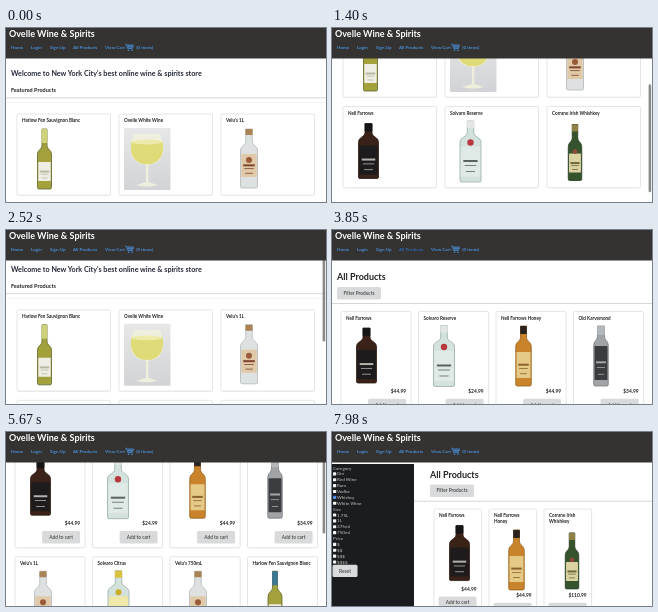
Write an HTML page that moves like this. It is 320 by 174 pixels and loops after 8000 ms.

```html
<!DOCTYPE html>
<html lang="en">
<head>
<meta charset="utf-8">
<title>Wine store</title>
<style>
html, body { margin: 0; width: 100%; height: 100%; overflow: hidden; background: #fff; }
svg { display: block; width: 100vw; height: 100vh; font-family: Lato, sans-serif; }
</style>
</head>
<body>
<svg id="stage" viewBox="0 0 320 174"></svg>
<script>
const LOOP = 8000, PAGE_AT = 3570, HOVER_END = 4270, FILTER_AT = 7350;
const stage = document.getElementById('stage');

const rect = (x, y, w, h, fill, r = 0, extra = '') =>
  `<rect x="${x}" y="${y}" width="${w}" height="${h}" rx="${r}" fill="${fill}" ${extra}/>`;
const text = (x, y, size, str, fill = '#222', weight = 700, anchor = 'start') =>
  `<text x="${x}" y="${y}" font-size="${size}" font-weight="${weight}" fill="${fill}" text-anchor="${anchor}">${str.replace(/&/g, '&amp;')}</text>`;
const group = (x, y, body) => `<g transform="translate(${x} ${y})">${body}</g>`;
const button = (x, y, w, label, fill = '#d9dadb') =>
  rect(x, y, w, 12.4, fill, 1.5) + text(x + w / 2, y + 7.8, 4.75, label, '#555', 700, 'middle');
const card = (x, y, w, h) =>
  rect(x, y + .6, w, h, '#eee', 1.5) + rect(x, y, w, h, '#fff', 1.5, 'stroke="#dcdcde" stroke-width=".7"');

// Bottle centred on x = 0, standing in a box 62 high.
// label: [y, height, colour, ink], tag: [y, radius, colour]
function bottle({ w, neck, top, base, shoulder, glass, edge, cap, capH, label, tag }) {
  const b = w / 2, n = neck / 2, s = shoulder;
  const [ly, lh, lc, ink] = label;
  const lines = [.45, .62, .82].map((f, i) =>
    rect(-w * (.34 - i * .06), ly + lh * f, w * (.68 - i * .12), i ? .8 : 2, ink)).join('');
  return `<path d="M${-n} ${top}H${n}V${s - 6}C${n} ${s - 1} ${b} ${s - 2} ${b} ${s + 4}V${base - 1.5}Q${b} ${base} ${b - 1.5} ${base}H${1.5 - b}Q${-b} ${base} ${-b} ${base - 1.5}V${s + 4}C${-b} ${s - 2} ${-n} ${s - 1} ${-n} ${s - 6}Z" fill="${glass}" stroke="${edge}" stroke-width=".8"/>`
    + rect(-n - .3, top, neck + .6, capH, cap, .7)
    + rect(.8 - b, ly, w - 1.6, lh, lc, .5) + lines
    + (tag ? `<circle cy="${tag[0]}" r="${tag[1]}" fill="${tag[2]}"/>` : '');
}

const wine = cap => bottle({ w: 14, neck: 5, top: 1, base: 61, shoulder: 23, glass: '#a2a13c', edge: '#5f6530', cap, capH: 14, label: [34, 19, '#f0eee4', '#b9b8a4'] });
const clear = (cap, label, tag) => bottle({ w: 21, neck: 6.5, top: .5, base: 61.5, shoulder: 18, glass: '#d3e2dc', edge: '#98ada6', cap, capH: 7, label, tag });
const vodka = bottle({ w: 17, neck: 6.5, top: 1, base: 60, shoulder: 19, glass: '#dde1e1', edge: '#b3b8b8', cap: '#a98256', capH: 6, label: [26, 23, '#dfc9a8', '#7e452c'], tag: [32, 3, '#9a5a3a'] });
const glassOfWine =
  rect(-20, 0, 46.5, 62, 'url(#pale)', 1)
  + '<path d="M-10 6C-17 24-13 36 3 37C19 36 23 24 16 6Z" fill="#efefdf"/>'
  + '<path d="M-12.6 14C-15 27-9 36 3 36.5C15 36 21 27 18.6 14Z" fill="#dedb78"/>'
  + '<ellipse cx="3" cy="14" rx="15.6" ry="2.4" fill="#ecebac"/>'
  + '<path d="M2 36H4.4V54L14 57Q3 60-8 57L2 54Z" fill="#eeeedd"/>';

// name ("|" marks a wrap point), image offset, price, picture
const P = {
  white: ['Harlow Fen |Sauvignon Blanc', 22.5, '$14.99', wine('#cdd17a')],
  white2: ['Harlow Fen |Sauvignon Blanc', 22.5, '$14.99', wine('#3c7794')],
  house: ['Ovelle White Wine', 20, '$9.99', glassOfWine],
  vodka: ["Velu's 1L", 23, '$29.99', vodka],
  vodka2: ["Velu's 750mL", 23, '$24.99', vodka],
  black: ['Nell Farrows', 20.5, '$44.99', bottle({ w: 20, neck: 7, top: 3, base: 58, shoulder: 18, glass: '#3a2219', edge: '#2a1a14', cap: '#151515', capH: 8, label: [25, 29, '#1d1b1b', '#b5b1ad'] })],
  rum: ['Solvaro Reserve', 20.5, '$24.99', clear('#e4e6e6', [26, 30, '#dfeae6', '#5a6360'], [22, 3.2, '#b8383d'])],
  lemon: ['Solvaro Citrus', 21, '$24.99', clear('#d9c23c', [26, 30, '#efe8a8', '#6a6645'], [22, 3, '#c9ae27'])],
  honey: ['Nell Farrows |Honey', 22.5, '$44.99', bottle({ w: 15.5, neck: 6, top: 1, base: 61, shoulder: 18, glass: '#c9842b', edge: '#96601f', cap: '#2a2320', capH: 8, label: [27, 26, '#e5c987', '#8a6330'] })],
  grey: ['Old Karvemond', 22.5, '$34.99', bottle({ w: 14.5, neck: 7, top: 1, base: 61, shoulder: 17, glass: '#a0a4a7', edge: '#777b7e', cap: '#b5b8ba', capH: 9, label: [21, 34, '#3a3c3f', '#a5a8aa'] })],
  irish: ['Corrane Irish |Whishkey', 23, '$110.99', bottle({ w: 13.5, neck: 5.5, top: 4, base: 60, shoulder: 23, glass: '#35532c', edge: '#263d22', cap: '#8f8045', capH: 7, label: [33, 19, '#dcd3a2', '#6c6a3c'], tag: [31, 2.4, '#8f4a3a'] })]
};
const HOME = [P.white, P.house, P.vodka, P.black, P.rum, P.irish];
const ALL = [P.black, P.rum, P.honey, P.grey, P.vodka, P.lemon, P.vodka2, P.white2];
const WHISKEY = [P.black, P.honey, P.irish];

// Smooth steps between [time, value] pairs.
function track(t, keys) {
  const i = keys.findIndex(k => k[0] > t);
  if (i < 0) return keys[keys.length - 1][1];
  if (!i) return keys[0][1];
  const [t0, a] = keys[i - 1], [t1, b] = keys[i], u = (t - t0) / (t1 - t0);
  return a + (b - a) * u * u * (3 - 2 * u);
}

// CSS "ease" curve
function ease(x) {
  if (x <= 0) return 0;
  if (x >= 1) return 1;
  let lo = 0, hi = 1, u;
  for (let i = 0; i < 20; i++) {
    u = (lo + hi) / 2;
    const bx = 3 * u * (1 - u) ** 2 * .25 + 3 * u * u * (1 - u) * .25 + u ** 3;
    if (bx < x) lo = u; else hi = u;
  }
  return 3 * u * (1 - u) ** 2 * .1 + 3 * u * u * (1 - u) + u ** 3;
}

function home() {
  return text(5, 48.2, 7.2, "Welcome to New York City's best online wine & spirits store", '#25283a')
    + text(5, 63.8, 5.5, 'Featured Products')
    + rect(0, 69.5, 320, .8, '#ccc') + rect(0, 74, 320, .5, '#e4e4e4')
    + HOME.map(([name, dx, , pic], i) => {
      const x = 11 + i % 3 * 102, y = 86 + Math.floor(i / 3) * 90.5;
      return card(x, y, 93.5, 81.2)
        + text(x + 5, y + 8, 4.6, name.replace('|', '')) + group(x + 5 + dx, y + 14, pic);
    }).join('');
}

function products(list, open, pressed) {
  const left = 5 + 93 * open, pitch = (315 + 3 * open - left) / 4, w = pitch - 7.4;
  const narrow = w < 51, rowExtra = narrow ? 6.3 : 0;
  return text(left, 50.2, 9, 'All Products')
    + button(left, 57, 44, 'Filter Products', pressed ? '#c6c7c8' : '#d9dadb')
    + rect(82 * open, 73.2, 320, .8, '#ccc')
    + list.map(([name, dx, price, pic], i) => {
      const x = left + 4 + i % 4 * pitch, y = 81.5 + Math.floor(i / 4) * (113 + rowExtra);
      const lines = narrow ? name.split('|') : [name.replace('|', '')];
      const drop = (lines.length - 1) * 6.3, end = x + w - 5;
      return card(x, y, w, 104 + rowExtra)
        + lines.map((s, n) => text(x + 5, y + 8 + n * 6.3, 4.6, s)).join('')
        + group(x + 5 + dx, y + 13.5 + drop, pic)
        + text(end, y + 81.5 + drop, 4.9, price, '#222', 700, 'end')
        + button(end - 38, y + 87.3 + drop, 38, 'Add to cart');
    }).join('');
}

const FILTERS = ['Category', '-Gin', '-Red Wine', '-Rum', '-Vodka', '-Whiskey', '-White Wine', 'Size',
  '-1.75L', '-1L', '-375ml', '-750ml', 'Price', '-$', '-$$', '-$$$', '-$$$$'];

function sidebar(checked) {
  return rect(0, 32, 82, 142, '#1b1c1d')
    + FILTERS.map((f, i) => {
      const y = 36 + i * 5.875;
      if (f[0] != '-') return text(1, y + 1.6, 4.6, f, '#b9bec6', 400);
      const on = checked && f == '-Whiskey';
      return rect(1, y - 1.6, 3.2, 3.2, on ? '#2f7de0' : '#f4f4f4', .6)
        + (on ? `<path d="M1.7 ${y}l.7.8 1.2-1.6" fill="none" stroke="#fff" stroke-width=".5"/>` : '')
        + text(5, y + 1.6, 4.6, f.slice(1), '#c6c6c6', 400);
    }).join('')
    + button(.5, 132.7, 25, 'Reset');
}

function header(hover) {
  const link = '#4a90dc';
  const nav = [[5, 'Home'], [25, 'Login'], [44, 'Sign Up'], [67, 'All Products'], [99, 'View Cart'], [130.3, '(0 items)']];
  return rect(0, 0, 320, 30.5, '#343332')
    + text(3, 8.6, 9, 'Ovelle Wine & Spirits', '#fff')
    + nav.map(([x, s]) => text(x, 20.8, 4.5, s, hover && s == 'All Products' ? '#2c68b4' : link)).join('')
    + `<path d="M119 16.2h1.4l1.3 4.4h4.6l1.2-3.6h-6.6M121.3 18.7h5.8M123 17v3.6M125 17v3.6" fill="none" stroke="${link}" stroke-width=".8"/>`
    + `<circle cx="122.5" cy="22.2" r=".8" fill="${link}"/><circle cx="126" cy="22.2" r=".8" fill="${link}"/>`;
}

const DEFS = '<defs><linearGradient id="pale" x2="0" y2="1"><stop stop-color="#e6e7e6"/><stop offset="1" stop-color="#d2d3d6"/></linearGradient></defs>';

function draw(t) {
  let body, bar = '';
  const thumb = (y, h) => rect(316.6, y, 2.6, h, '#8a8a8a', 1.3);
  if (t < PAGE_AT) {
    const s = track(t, [[490, 0], [980, 98], [1750, 98], [2660, 0]]);
    body = group(0, -s, home());
    if (t > 490 && t < 2800) bar = thumb(.575 * s, 108);
  } else {
    const s = track(t, [[4410, 0], [5250, 86.5], [5500, 86.5], [6090, 4.4]]);
    const open = ease((t - 6375) / 500);
    body = group(0, -s, products(t < FILTER_AT ? ALL : WHISKEY, open, t > 6200 && t < 6930));
    if (open) body += group(82 * (open - 1), 0, sidebar(t >= FILTER_AT));
    if (t > 4410 && t < 6200) bar = thumb(1 + .41 * s, 72);
  }
  stage.innerHTML = DEFS + body + bar + header(t >= PAGE_AT && t < HOVER_END);
}

function tick() {
  draw(performance.now() % LOOP);
  requestAnimationFrame(tick);
}
tick();
</script>
</body>
</html>
```
